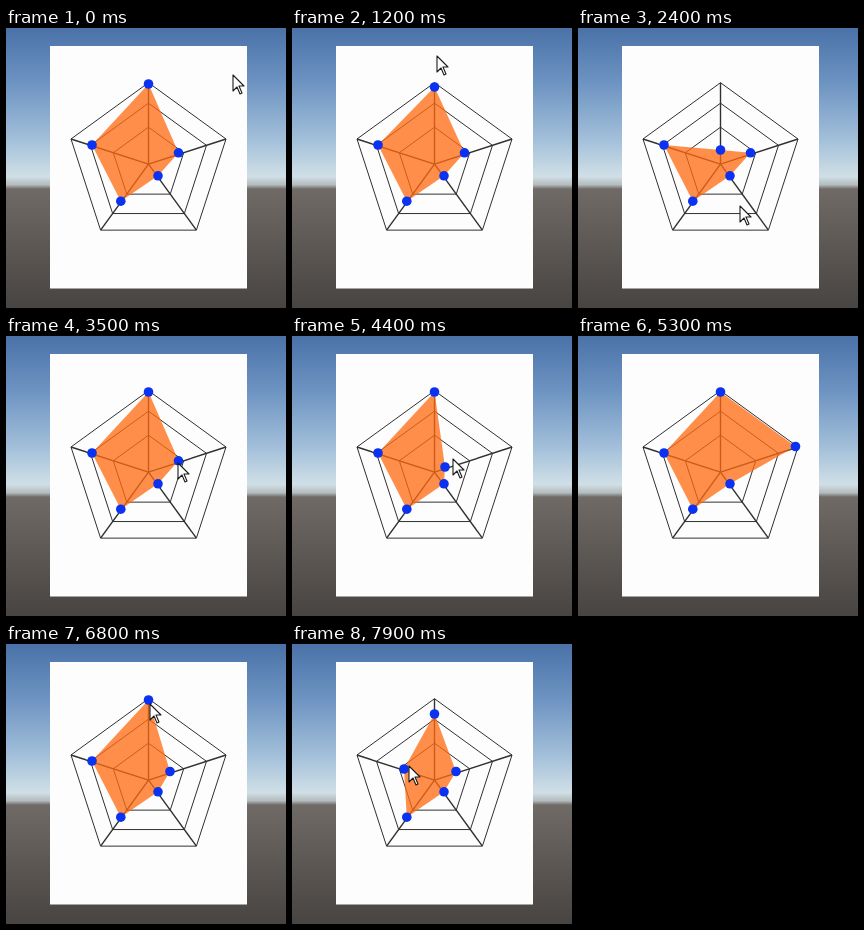
Animation, 280 px wide and 280 px high, one loop 8 s. Source, as an HTML page:

```html
<!DOCTYPE html>
<html lang="en">
<head>
<meta charset="utf-8">
<title>Radar chart</title>
<style>
  html, body { margin: 0; width: 100%; height: 100%; overflow: hidden; }
  svg { display: block; width: 100vw; height: 100vh; }
  #grid path { fill: none; stroke: #303030; }
</style>
</head>
<body>
<svg viewBox="0 0 280 280">
  <defs>
    <linearGradient id="sky" x1="0" y1="0" x2="0" y2="1">
      <stop offset="0" stop-color="#4a72a8"/>
      <stop offset=".2" stop-color="#6e94c2"/>
      <stop offset=".4" stop-color="#a3c0da"/>
      <stop offset=".53" stop-color="#d0dfe6"/>
      <stop offset=".56" stop-color="#b4bcbe"/>
      <stop offset=".575" stop-color="#6f6a66"/>
      <stop offset="1" stop-color="#484441"/>
    </linearGradient>
  </defs>
  <rect width="280" height="280" fill="url(#sky)"/>
  <rect x="44" y="18" width="197" height="242.5" fill="#fdfdfd"/>
  <g id="grid"></g>
  <polygon id="area" fill="#ff6a0f" fill-opacity=".75"/>
  <g id="dots" fill="#0a32f0"></g>
  <path id="cursor" d="M0 0V16L4 12 7 19 9 18 6 11H11Z"
        fill="#fff" stroke="#1c1c1c" stroke-width="1.1" stroke-linejoin="round"/>
</svg>
<script>
const NS = 'http://www.w3.org/2000/svg';
const $ = id => document.getElementById(id);
const clamp = (v, lo, hi) => Math.min(hi, Math.max(lo, v));

// Pointer path: tick, x, y. It rests on the ticks in holds.
const path = [
  [0, 227, 47], [7, 142, 56], [11, 144, 59], [12, 145, 28], [13, 148, 0], [16, 166, 157],
  [19, 146, 24], [21, 132, 231], [23, 161, 231], [24, 162, 178], [25, 148, 50], [26, 146, 22],
  [29, 146, 12], [34, 175, 135], [35, 172, 127], [40, 250, 105], [43, 88, 150], [44, 161, 123],
  [46, 272, 95], [48, 95, 145], [50, 264, 108], [51, 104, 138], [53, 300, 100], [56, 138, 126],
  [60, 187, 115], [62, 172, 119], [68, 144, 60], [70, 134, 80], [76, 89, 117], [79, 117, 122]
];
const holds = [8, 27, 28, 36, 41, 52, 54, 57, 61, 71, 77, 78];

function pointer(t) {
  while (holds.includes(t)) t--;
  t = Math.max(0, t);
  const i = path.findIndex(k => k[0] >= t);
  const b = path[i], a = path[Math.max(0, i - 1)];
  const p = a === b ? 0 : (t - a[0]) / (b[0] - a[0]);
  return { x: a[1] + (b[1] - a[1]) * p, y: a[2] + (b[2] - a[2]) * p };
}

// Each dragged corner follows the pointer along its own axis.
function topY(t) {
  return t > 27 && t < 69 ? 56 : clamp(pointer(Math.min(t, 70) - 1).y, 56, 122);
}
function rightX(t) {
  return t < 37 ? 172.5 : clamp(pointer(Math.min(t, 62)).x - 8, 153, 217.5);
}
function leftX(t) {
  return t < 79 ? 86 : pointer(t).x - 5;
}

function add(parent, tag, attrs) {
  const el = document.createElementNS(NS, tag);
  for (const k in attrs) el.setAttribute(k, attrs[k]);
  return parent.appendChild(el);
}

const cx = 142.5, cy = 136.2, size = 81.5;
const sides = [...Array(5).keys()];
const corner = (r, i) => {
  const a = i * Math.PI * 2 / 5;
  return [cx + r * Math.sin(a), cy - r * Math.cos(a)];
};
for (const r of [size, 61, 37])
  add($('grid'), 'path', { d: 'M' + sides.map(i => corner(r, i)).join('L') + 'Z' });
for (const i of sides)
  add($('grid'), 'path', { d: `M${cx} ${cy}L${corner(size, i)}`, 'stroke-width': 1.4 });
const dots = sides.map(() => add($('dots'), 'circle', { r: 4.8 }));

function draw(t) {
  const rx = rightX(t), lx = leftX(t), { x, y } = pointer(t);
  const pts = [
    [cx, topY(t)],
    [rx, 110.5 + (217.5 - rx) * 0.318],
    [152, 147.8],
    [114.8, 173.2],
    [lx, 117 + (lx - 86) * 0.308]
  ];
  $('area').setAttribute('points', pts.join(' '));
  dots.forEach((d, i) => {
    d.setAttribute('cx', pts[i][0]);
    d.setAttribute('cy', pts[i][1]);
  });
  $('cursor').setAttribute('transform', `translate(${x} ${y})`);
}

const start = performance.now();
function loop() {
  const ms = Math.max(0, performance.now() - start) % 8000;
  draw(Math.floor(ms / 100));
  requestAnimationFrame(loop);
}
loop();
</script>
</body>
</html>
```
